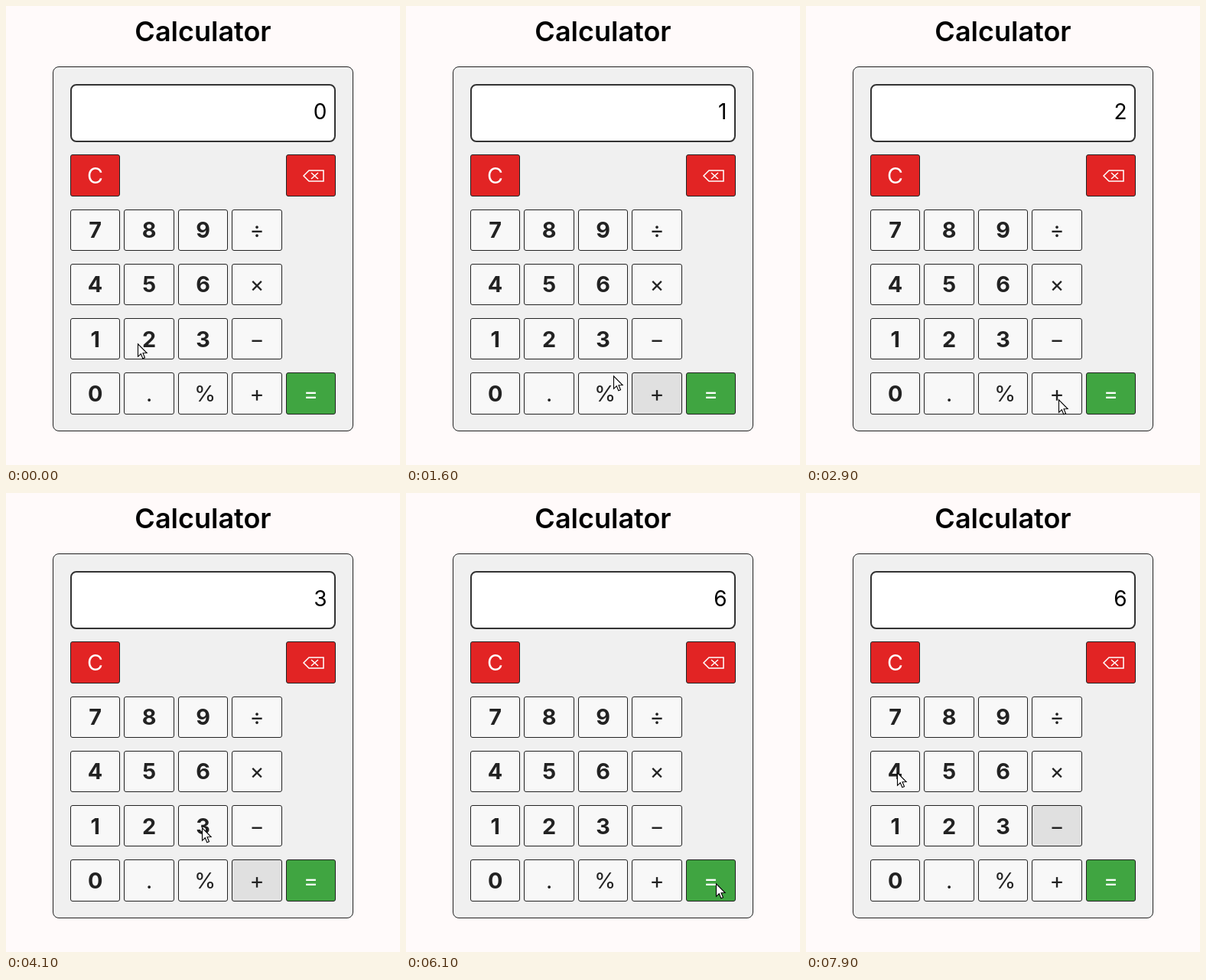
Recreate the animation shown at these times as an HTML page with a canvas. Size 515 by 600 pixels, loop 8 s.

```html
<!DOCTYPE html>
<html lang="en">
<head>
<meta charset="utf-8">
<title>Calculator</title>
<style>
  html, body { margin: 0; width: 100%; height: 100%; overflow: hidden; background: #fffafa; }
  canvas { display: block; }
</style>
</head>
<body>
<canvas id="stage" width="515" height="600"></canvas>
<script>
const ctx = document.getElementById('stage').getContext('2d');
const LOOP = 8000, STEP = 100;
const FONT = 'Inter, "Liberation Sans", sans-serif';
const INK = '#222', RED = '#e22424', GREEN = '#40a541', GREY = '#e0e0e0';

const rows = ['C   ⌫', '789÷', '456×', '123−', '0.%+='];

// Pointer moves: start, end, x, y
const moves = [
  [0, 200, 114, 438], [600, 900, 460, 542], [900, 1300, 330, 517],
  [1500, 1900, 196, 440], [2000, 2400, 284, 495], [2600, 2900, 330, 514],
  [3600, 4100, 256, 437], [4400, 4500, 258, 437], [4600, 4800, 426, 529],
  [4900, 5100, 412, 516], [6000, 6100, 405, 510], [6100, 6600, 353, 394],
  [6600, 6900, 346, 424], [6900, 7100, 332, 436], [7300, 7900, 119, 365]
];

// Key presses, each held for one step
const presses = [[500, '1'], [1400, '+'], [1900, '2'], [3500, '+'], [4200, '3'], [5200, '='], [7200, '−']];
// Display values by start time
const values = [[0, '0'], [600, '1'], [2000, '2'], [3600, '3'], [5300, '6']];

function box(x, y, w, h, r, fill, stroke, line = 1) {
  ctx.beginPath();
  ctx.roundRect(x + line / 2, y + line / 2, w - line, h - line, r - line / 2);
  ctx.fillStyle = fill;
  ctx.fill();
  ctx.strokeStyle = stroke;
  ctx.lineWidth = line;
  ctx.stroke();
}

function text(str, x, y, size, weight, color, align = 'center') {
  ctx.font = `${weight} ${size}px ${FONT}`;
  ctx.textAlign = align;
  ctx.fillStyle = color;
  ctx.fillText(str, x, y);
}

function eraseIcon(x, y) {
  ctx.beginPath();
  ctx.moveTo(x - 13, y);
  ctx.lineTo(x - 6, y - 7);
  ctx.lineTo(x + 13, y - 7);
  ctx.lineTo(x + 13, y + 7);
  ctx.lineTo(x - 6, y + 7);
  ctx.closePath();
  for (const s of [-1, 1]) {
    ctx.moveTo(x - 3, y - 4 * s);
    ctx.lineTo(x + 6, y + 4 * s);
  }
  ctx.strokeStyle = '#fff';
  ctx.lineWidth = 1.5;
  ctx.stroke();
}

// An operator stays lit until the next key has been released
function isLit(key, t) {
  const i = presses.findLastIndex(p => p[0] <= t);
  if (i < 0) return false;
  const [at, last] = presses[i];
  if (last === key) return t < at + STEP || '+−'.includes(key);
  return i > 0 && t < at + STEP && presses[i - 1][1] === key && '+−'.includes(key);
}

function drawKey(key, col, row, t) {
  const x = Math.round(83.9 + 70.5 * col), right = Math.round(149.3 + 70.5 * col);
  const y = Math.round(194.4 + 71.2 * row), bottom = Math.round(248.8 + 71.2 * row);
  const cx = 116.6 + 70.5 * col, base = Math.round(232 + 71.2 * row);
  const tinted = 'C⌫='.includes(key), lit = isLit(key, t);

  let fill = lit ? GREY : '#f8f8f8';
  if (tinted) fill = key !== '=' ? RED : lit ? '#378e38' : GREEN;
  box(x, y, right - x, bottom - y, 3, fill, INK);

  if (key === '⌫') eraseIcon(402, 222);
  else text(key, key === '%' ? cx + 2.5 : cx, base, 28.8, /\d/.test(key) ? 700 : 400, tinted ? '#fff' : INK);
}

function pointerAt(t) {
  let x = 172, y = 441;
  for (const [from, to, tx, ty] of moves) {
    if (t <= from) break;
    const k = Math.min(1, (t - from) / (to - from));
    const ease = 1 - (1 - k) ** 2;
    x += (tx - x) * ease;
    y += (ty - y) * ease;
  }
  return [Math.round(x), Math.round(y)];
}

const arrow = new Path2D('M0 0V16.5L3.8 13 6.3 19 9 17.9 6.5 12 11.6 11.8Z');

function drawPointer(x, y) {
  ctx.save();
  ctx.translate(x + 0.5, y + 0.8);
  ctx.fillStyle = '#fff';
  ctx.fill(arrow);
  ctx.strokeStyle = '#000';
  ctx.lineWidth = 1.1;
  ctx.stroke(arrow);
  ctx.restore();
}

function draw(t) {
  ctx.fillStyle = '#fffafa';
  ctx.fillRect(0, 0, 515, 600);
  text('Calculator', 257.5, 46, 36, 600, '#000');
  box(61, 79, 393, 477, 8, '#f0f0f0', INK);
  box(84, 102, 347, 76, 8, '#fff', '#333', 2);
  const shown = values.findLast(v => v[0] <= t)[1];
  text(shown, 419.5, 148, 28, 400, '#000', 'right');
  rows.forEach((row, r) => [...row].forEach((key, c) => {
    if (key !== ' ') drawKey(key, c, r, t);
  }));
  drawPointer(...pointerAt(t));
}

function frame() {
  const t = performance.now() % LOOP;
  draw(Math.floor(t / STEP) * STEP);
  requestAnimationFrame(frame);
}
frame();
</script>
</body>
</html>
```
